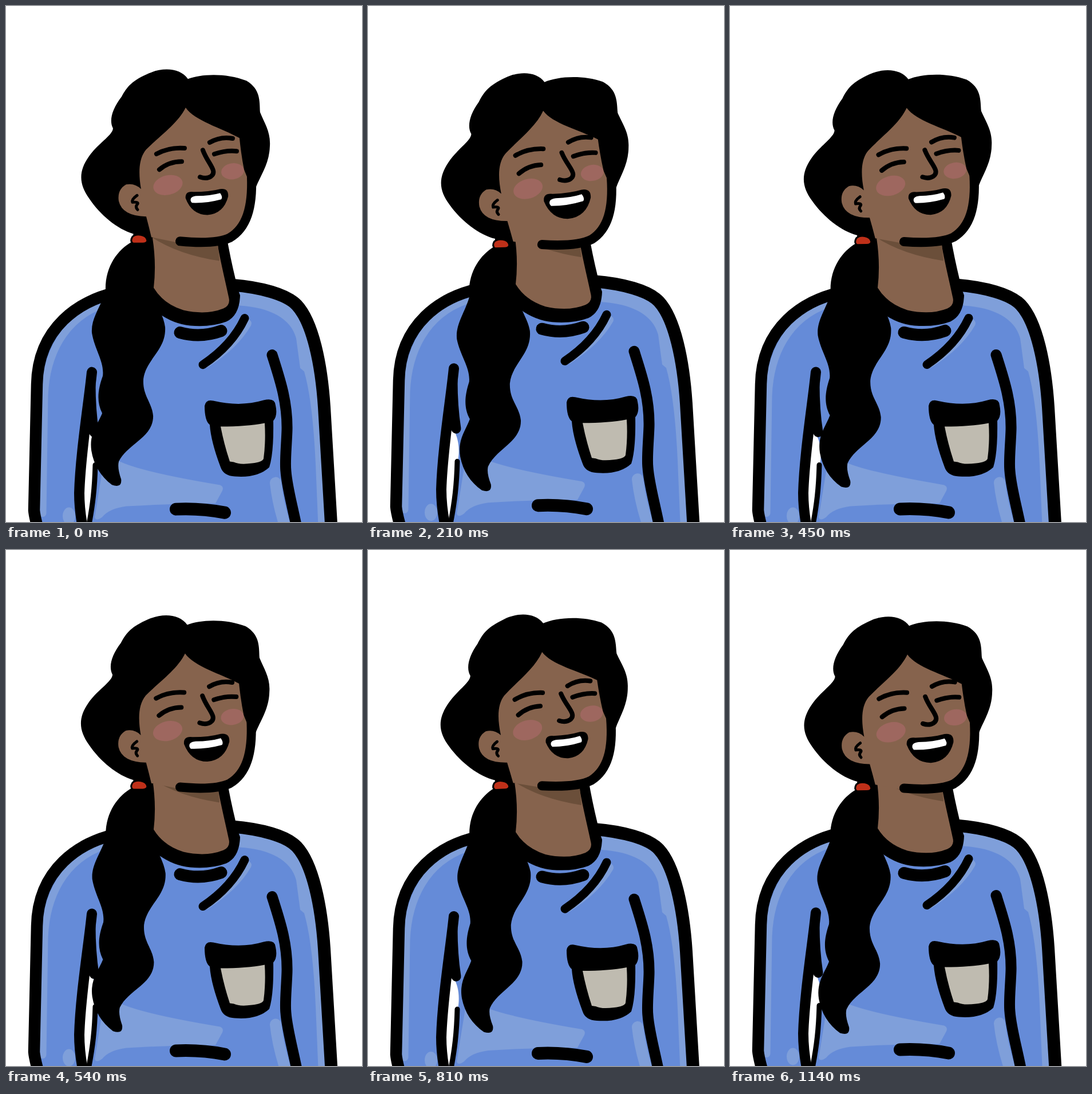
An HTML page that plays this animation: 622x900 px, repeating every 1170 ms.

```html
<!DOCTYPE html>
<html lang="en">
<head>
<meta charset="utf-8">
<title>Laughing woman</title>
<style>
html, body { margin: 0; width: 100%; height: 100%; overflow: hidden; background: #fff; }
svg { display: block; width: 100%; height: 100%; }
.line { fill: none; stroke: #000; stroke-linecap: round; stroke-linejoin: round; }
.glow { fill: none; stroke: #7f9fda; stroke-linecap: round; }
.skin { fill: #86634d; }
.blush { fill: #9e675f; }
</style>
</head>
<body>
<svg viewBox="0 0 622 900">
  <g class="body">
    <path fill="#658bd8" d="M190 502C130 515 56 560 54 660L49 880Q50 892 58 920H569L556 700C551 625 536 552 508 522C490 503 445 491 395 487Z"/>
    <g class="glow">
      <path stroke-width="13" d="M64 885L67 680C70 610 100 545 172 520"/>
      <path stroke-width="20" d="M471 832Q475 870 490 915"/>
      <path stroke-width="14" d="M422 554Q400 592 350 624"/>
    </g>
    <g fill="#7f9fda">
      <path d="M408 523C460 526 498 545 507 580L514 632L521 638Q536 690 541 800L546 920H569L556 700C551 625 536 552 508 522C490 503 445 491 395 487Z"/>
      <ellipse cx="110" cy="890" rx="11" ry="15"/>
      <path d="M195 793Q230 812 374 836Q381 839 378 846L366 868Q290 868 210 873Q180 877 168 892Q157 900 155 892L170 800Z"/>
    </g>
    <path fill="#fff" d="M146 742C158 755 161 780 157 800C155 845 151 875 143 920H138C132 860 138 790 146 742Z"/>
    <g class="line">
      <path stroke-width="20.5" d="M190 501C130 514 56 560 54 660L49 880Q50 892 58 920"/>
      <path stroke-width="22" d="M395 487C445 491 490 503 508 522C536 552 551 625 556 700L569 920"/>
      <path stroke-width="18" d="M150 639C145 690 130 780 128 850Q128 880 135 915"/>
      <path stroke-width="17" d="M148 660Q148 705 154 744"/>
      <path stroke-width="9" d="M156 801C155 840 152 870 143 915"/>
      <path stroke-width="19" d="M465 609C478 650 492 690 491 740C490 770 487 795 489 812C491 840 500 870 509 915"/>
      <path stroke-width="22" d="M297 878Q340 876 382 884"/>
      <path stroke-width="21" d="M304 570Q340 580 376 567"/>
      <path stroke-width="15" d="M417 545Q395 592 344 626"/>
    </g>
    <path d="M347 698Q349 686 362 689Q410 700 450 688Q470 683 471 697Q475 715 467 724Q468 780 460 805Q440 824 400 821Q380 820 375 805Q358 760 356 731Q347 724 347 698Z"/>
    <path fill="#bfbbb0" d="M375 734Q420 734 452 728Q454 760 450 790Q448 796 430 798Q408 801 398 796L391 795Q381 765 375 734Z"/>
  </g>

  <g class="head">
    <path d="M220 411C195 425 172 455 174 498C165 525 148 545 150 570C155 600 172 620 169 645C160 670 158 690 168 710C160 730 145 745 149 775C153 800 165 820 185 835Q203 841 201 825Q194 805 197 794C212 763 257 753 257 715C255 690 238 680 240 650C245 615 280 600 278 560C275 535 258 520 260 490L257 385H225Z"/>
  </g>

  <g class="body">
    <path d="M252 410V500L266 536Q292 555 322 558Q358 561 385 551Q408 540 409 505Q403 490 401 477Q392 440 385 400H252Z"/>
    <path class="skin" d="M246 385L256 405Q263 450 258 492Q275 520 310 531Q350 540 380 528Q393 522 389 508C381 470 373 440 367 400Z"/>
    <path fill="#6b4f3a" d="M252 402Q300 434 373 445L368 395H256Z"/>
  </g>

  <g class="head">
    <path d="M318 127C305 108 275 106 250 117C220 130 212 140 202 158C185 180 180 200 187 213C187 225 160 240 145 262C125 290 129 312 145 335C165 365 195 389 222 397L250 406L300 390L437 315C445 295 460 275 461 245C463 220 452 205 444 185C443 165 445 145 420 130C385 116 340 118 318 127Z"/>
    <path fill="#bf3019" stroke="#000" stroke-width="3" d="M221 402Q227 397 236 399Q246 401 247 409Q246 414 239 414L222 414Q216 410 221 402Z"/>
    <path class="skin" d="M314 177C330 200 375 212 408 230Q411 260 416 285L424 305C424 350 412 385 386 402Q350 415 303 413L254 403Q250 386 245 367Q203 366 197 340Q194 320 210 311Q225 308 236 319C231 290 232 265 245 250C270 225 300 205 314 177Z"/>
    <ellipse class="blush" cx="283" cy="312" rx="26" ry="17" transform="rotate(-14 283 312)"/>
    <ellipse class="blush" cx="396" cy="288" rx="20" ry="14" transform="rotate(-8 396 288)"/>
    <g class="line" stroke-width="8">
      <path stroke-width="16" d="M429 298C431 352 420 387 391 404Q365 416 304 410"/>
      <g id="brows">
        <path d="M263 258Q285 246 312 248"/>
        <path d="M356 238Q375 227 396 231"/>
      </g>
      <path d="M268 285Q285 271 307 271"/>
      <path d="M364 258Q385 251 403 253"/>
      <path d="M344 251C352 274 371 288 358 297Q350 302 339 298"/>
      <path stroke-width="5" d="M229 330Q219 337 221 342Q232 341 230 345Q225 350 230 355"/>
    </g>
    <g id="mouth">
      <path d="M314 335Q313 322 328 324Q355 324 374 319Q389 317 388 332Q380 362 352 364Q325 364 314 335Z"/>
      <path fill="#fff" d="M323 340Q321 332 333 331Q357 331 374 326Q379 333 376 337Q350 344 325 343Z"/>
    </g>
  </g>
</svg>
<script>
const LOOP = 1170, SLOT = 30;
const bodies = document.querySelectorAll('.body');
const heads = document.querySelectorAll('.head');
const mouth = document.getElementById('mouth');
const brows = document.getElementById('brows');

// Poses are drawn four to every five slots; the last few ease off.
function poseAt(ms) {
  const slot = Math.floor((ms % LOOP) / SLOT + 1e-4);
  const n = slot - Math.floor((slot + 4) / 5);
  return n < 26 ? n : 26 + (n - 26) * 0.4;
}

function draw(now) {
  const n = poseAt(Math.max(0, now));
  const sway = (1 - Math.cos((23.86 * n - 10) * Math.PI / 180)) / 2;
  const bob = 7.3 * (1 - Math.cos(2 * Math.PI * (n - 0.75) / 10.3)) / 2;
  const grow = 1 + 0.016 * bob;
  for (const el of bodies) el.setAttribute('transform', `translate(0 ${-bob})`);
  for (const el of heads) {
    el.setAttribute('transform', `translate(0 ${0.77 * bob}) rotate(${-2.87 * sway} 330 415)`);
  }
  brows.setAttribute('transform', `translate(0 ${-0.7 * bob})`);
  mouth.setAttribute('transform', `translate(351 340) scale(${grow}) translate(-351 -340)`);
}

function tick(now) {
  draw(now);
  requestAnimationFrame(tick);
}
draw(0);
requestAnimationFrame(tick);
</script>
</body>
</html>
```
